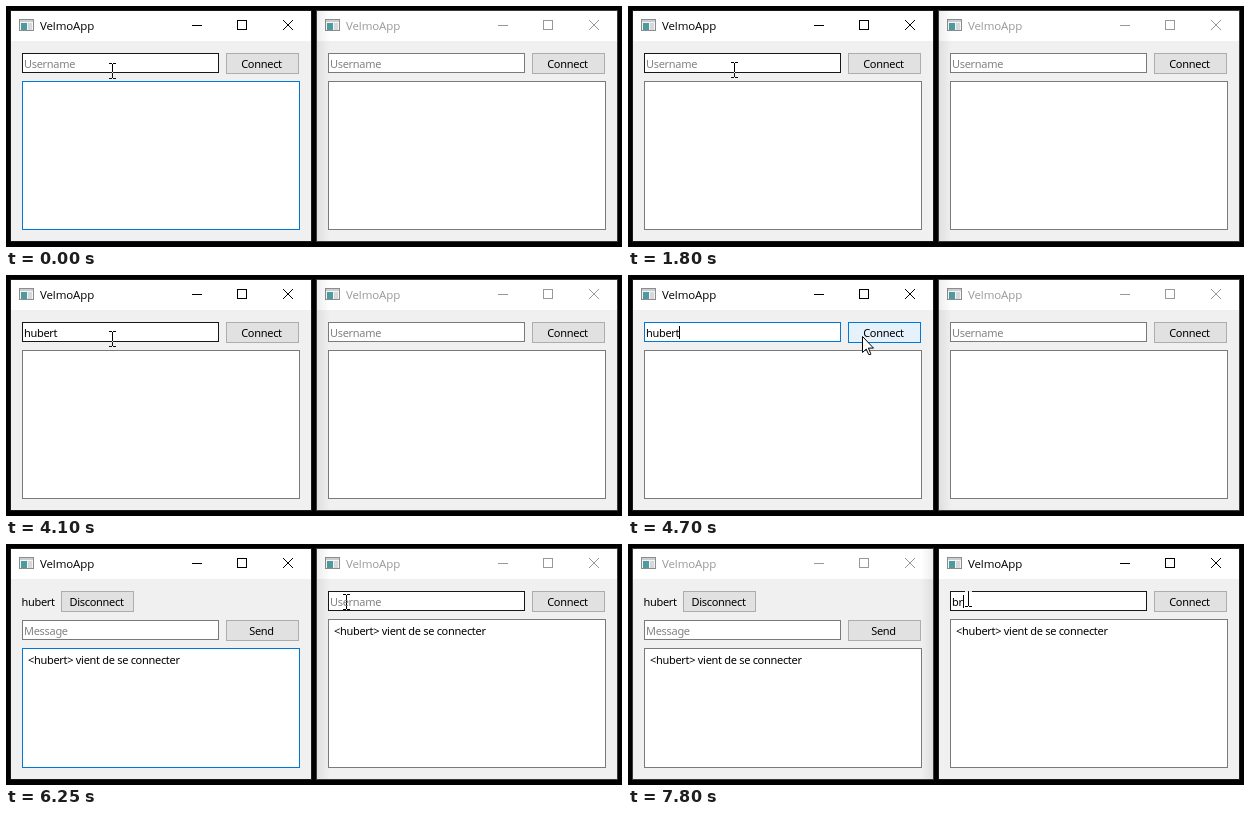
Write an HTML page with a canvas that moves like this. It is 616 by 241 pixels and loops after 8 s.

```html
<!DOCTYPE html>
<html lang="fr">
<head>
<meta charset="utf-8">
<title>VelmoApp</title>
<style>
html, body { margin: 0; width: 616px; height: 241px; overflow: hidden; background: #000; }
canvas { display: block; }
</style>
</head>
<body>
<canvas id="stage" width="616" height="241"></canvas>
<script>
const ctx = document.getElementById('stage').getContext('2d');
const LOOP = 8000, CONNECTED = 5390, SWITCH = 6530;
const BLUE = '#0078d7', GRAY = '#7a7a7a', DARK = '#171717';
const USER = 'hubert', NOTICE = `<${USER}> vient de se connecter`;

// [start, kind, x, y]: tip of the arrow, or top centre of the text cursor
const pointer = [
  [0, 'beam', 106, 57], [590, 'beam', 106, 56], [4220, 'beam', 169, 50],
  [4390, 'arrow', 218, 63], [4550, 'arrow', 227, 63], [4700, 'arrow', 234, 61],
  [4980, 'arrow', 237, 57], [5520, 'arrow', 242, 55], [5810, 'arrow', 293, 54],
  [5960, 'beam', 333, 50], [6110, 'beam', 337, 50], [6250, 'beam', 340, 50],
  [6970, 'beam', 340, 47]
];
const leftTyping = [[0, 0], [2560, 1], [2840, 2], [3120, 4], [3390, 5], [3520, 6]];
const rightTyping = [[0, 0], [7370, 1], [7800, 2]];
const caretToggles = [310, 720, 1350, 1800, 2400, 4100, 4700, 5250, 6530, 7100, 7370];

const current = (rows, t) => rows.filter(row => row[0] <= t).pop();

function fill(x, y, w, h, color) {
  ctx.fillStyle = color;
  ctx.fillRect(x, y, w, h);
}

function box(x, y, w, h, color, border) {
  fill(x, y, w, h, border);
  fill(x + 1, y + 1, w - 2, h - 2, color);
}

function text(str, x, y, color = '#000', align = 'left') {
  ctx.font = '11px "Noto Sans", "Open Sans", sans-serif';
  ctx.letterSpacing = '-0.3px';
  ctx.textAlign = align;
  ctx.fillStyle = color;
  ctx.fillText(str, x, y);
}

function line(points, color) {
  ctx.beginPath();
  points.forEach(([x, y]) => ctx.lineTo(x, y));
  ctx.strokeStyle = color;
  ctx.stroke();
}

function button(label, x, y, hover) {
  box(x, y, 73, 21, hover ? '#e5f1fb' : '#e1e1e1', hover ? BLUE : '#adadad');
  text(label, x + 35.5, y + 15, '#000', 'center');
}

function input(y, value, hint, border, caret) {
  box(16, y, 197, 20, '#fff', border);
  text(value || hint, 18, y + 15, value ? '#000' : '#838383');
  if (caret) fill(18 + Math.max(1, Math.round(ctx.measureText(value).width)), y + 4, 1, 13, '#000');
}

function list(y, focused, message) {
  box(16, y, 278, 224 - y, '#fff', focused ? BLUE : GRAY);
  if (message) text(message, 22, y + 16);
}

function frame(active) {
  const ink = active ? '#000' : '#999';
  box(4, 4, 302, 232, '#f0f0f0', active ? '#1a1a1a' : '#3a3a3a');
  fill(5, 5, 300, 30, '#fff');

  box(13, 13, 15, 12, '#f4f4f4', '#8c8c8c');
  fill(14, 14, 13, 2, '#c9ced2');
  fill(15, 17, 6, 7, '#4f9a9c');
  fill(22, 17, 4, 7, '#d5d9dc');

  ctx.font = '11.5px "Open Sans", "Noto Sans", sans-serif';
  ctx.letterSpacing = '-0.1px';
  ctx.textAlign = 'left';
  ctx.fillStyle = ink;
  ctx.fillText('VelmoApp', 34, 24);

  fill(186, 19, 10, 1, ink);
  ctx.strokeStyle = ink;
  ctx.strokeRect(231.5, 14.5, 9, 9);
  line([[277, 14], [287, 24]], ink);
  line([[287, 14], [277, 24]], ink);
}

function shadow(from, to) {
  const g = ctx.createLinearGradient(from, 0, to, 0);
  g.addColorStop(0, 'rgba(0,0,0,.07)');
  g.addColorStop(1, 'rgba(0,0,0,0)');
  fill(Math.min(from, to), 5, Math.abs(to - from), 230, g);
}

function leftWindow(t, caret) {
  frame(t < SWITCH);
  if (t >= SWITCH) shadow(305, 293);
  if (t < CONNECTED) {
    const typed = USER.slice(0, current(leftTyping, t)[1]);
    input(47, typed, 'Username', t < 4390 ? DARK : BLUE, caret);
    button('Connect', 220, 47, t >= 4550);
    list(75, t < 310);
  } else {
    text(USER, 15.5, 62);
    button('Disconnect', 55, 47);
    input(76, '', 'Message', GRAY);
    button('Send', 220, 76);
    list(104, t < SWITCH, NOTICE);
  }
}

function rightWindow(t, caret) {
  ctx.save();
  ctx.translate(306, 0);
  frame(t >= SWITCH);
  if (t < SWITCH) shadow(5, 18);
  const typed = 'br'.slice(0, current(rightTyping, t)[1]);
  input(47, typed, 'Username', t >= 5960 ? DARK : GRAY, caret && t >= SWITCH);
  button('Connect', 220, 47);
  list(75, false, t >= CONNECTED && NOTICE);
  ctx.restore();
}

function drawPointer([, kind, x, y]) {
  ctx.save();
  if (kind === 'beam') {
    // inverts whatever lies below
    ctx.globalCompositeOperation = 'difference';
    fill(x, y + 1, 1, 14, '#fff');
    for (const dy of [0, 15]) {
      fill(x - 3, y + dy, 3, 1, '#fff');
      fill(x + 1, y + dy, 3, 1, '#fff');
    }
  } else {
    ctx.translate(x + .5, y + .5);
    const arrow = new Path2D('M0 0V16L3.7 12.6L6.2 18H8.2V17L5.9 11.6H11Z');
    ctx.fillStyle = '#fff';
    ctx.fill(arrow);
    ctx.strokeStyle = '#000';
    ctx.stroke(arrow);
  }
  ctx.restore();
}

function draw() {
  const t = performance.now() % LOOP;
  const caret = caretToggles.filter(s => s <= t).length % 2 === 1;
  fill(0, 0, 616, 241, '#000');
  leftWindow(t, caret);
  rightWindow(t, caret);
  drawPointer(current(pointer, t));
  requestAnimationFrame(draw);
}
draw();
</script>
</body>
</html>
```
